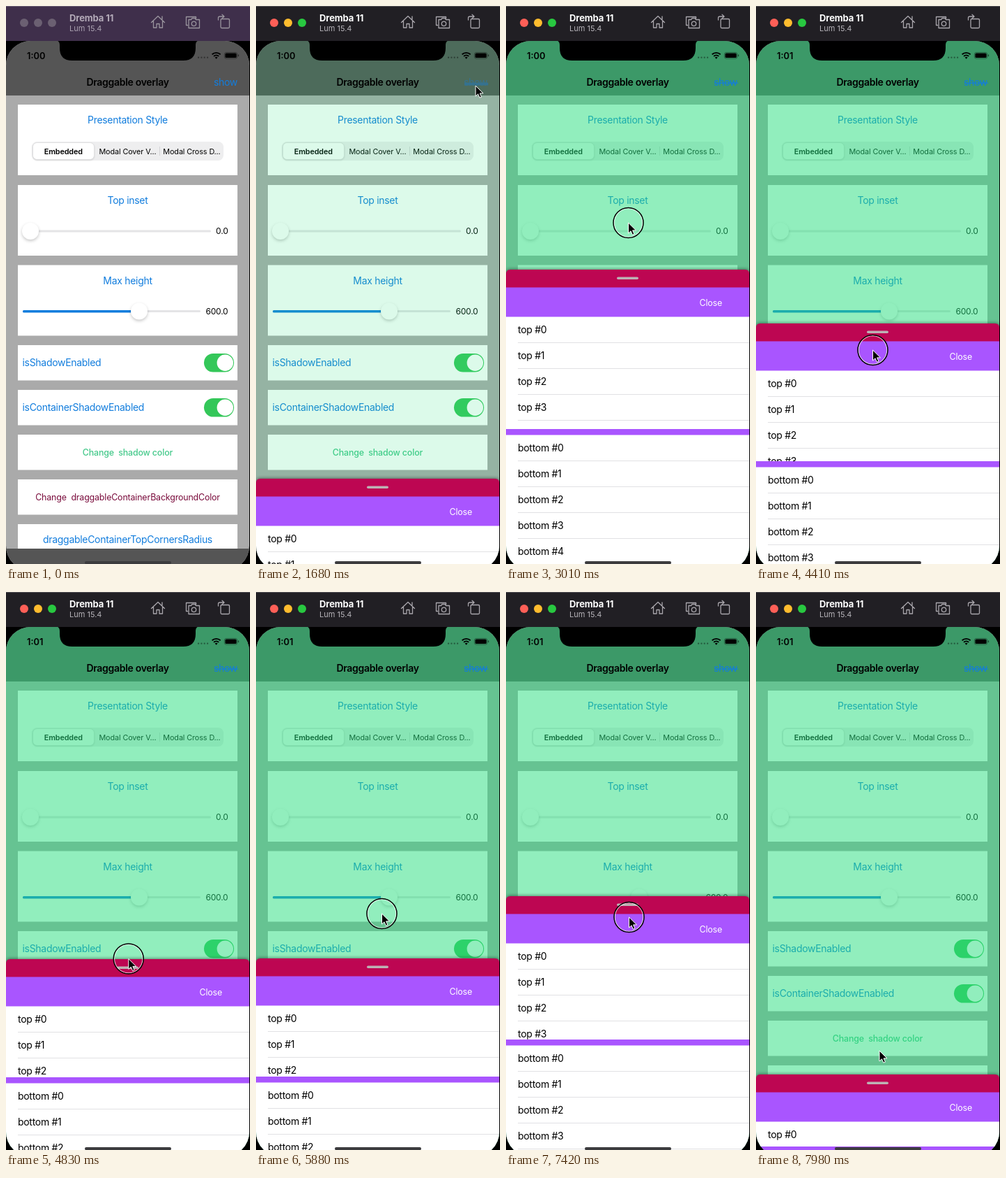
These frames come from a looping animation (350x798 px, 8 s). An HTML page:

```html
<!DOCTYPE html>
<html lang="en">
<head>
<meta charset="utf-8">
<title>Draggable overlay</title>
<style>
  html, body { margin: 0; width: 100%; height: 100%; overflow: hidden; background: #000; }
  svg { display: block; width: 350px; height: 798px; }
  text { font: 400 14px Inter, sans-serif; letter-spacing: -.3px; white-space: pre; }
  .small { font-size: 12.4px; letter-spacing: -.15px; }
  .value { font-size: 12px; letter-spacing: -.2px; }
  .segment { font-size: 10.8px; letter-spacing: -.1px; }
  .semi { font-weight: 600; }
  .link { fill: #127ddd; }
  .thumb { fill: #fff; filter: drop-shadow(0 2px 2px rgba(0,0,0,.22)); }
  #icons { fill: none; stroke: #a9a6ac; stroke-width: 1.3; stroke-linejoin: round; stroke-linecap: round; }
  #sheet { filter: drop-shadow(0 -1px 2px rgba(0,0,0,.4)); }
</style>
</head>
<body>
<svg id="stage" viewBox="0 0 350 798"></svg>
<script>
const LOOP = 8000, STEP = 70;
const TOP = 377, HIDDEN = 820;

const rect = (x, y, w, h, fill, r = 0, extra = '') =>
  `<rect x="${x}" y="${y}" width="${w}" height="${h}" rx="${r}" fill="${fill}" ${extra}/>`;
const circle = (x, y, r, fill, extra = '') =>
  `<circle cx="${x}" cy="${y}" r="${r}" fill="${fill}" ${extra}/>`;
const text = (x, y, str, cls = '', anchor = 'start', extra = '') =>
  `<text x="${x}" y="${y}" class="${cls}" text-anchor="${anchor}" ${extra}>${str}</text>`;
const card = (y, h) => rect(17, y, 315, h, '#fff');
const thumb = (x, y) => circle(x, y, 12, '#fff', 'class="thumb"');

function slider(y, title, end, at, value) {
  const mid = y + 66;
  return card(y, 101) + text(174.5, y + 27, title, 'link', 'middle')
    + rect(24, mid - 1.5, end - 24, 3, '#e4e4e6', 1.5)
    + (at > 40 ? rect(24, mid - 1.5, at - 24, 3.4, '#127ddd', 1.5) : '')
    + thumb(at, mid) + text(318.5, mid + 4, value, 'value', 'end');
}

function toggle(y, label) {
  return card(y, 50.5) + text(23.5, y + 30, label, 'link')
    + rect(284, y + 12, 43, 26.5, '#34c759', 13.2) + circle(314.3, y + 25.2, 11.7, '#fff');
}

function button(y, label, color, weight) {
  return card(y, 50.5) + text(174.5, y + 30, label, 'small', 'middle', `fill="${color}" style="font-weight:${weight}"`);
}

const settings = card(141, 101)
  + text(174.5, 168, 'Presentation Style', 'link', 'middle')
  + rect(37, 194, 275, 27, '#eeeeef', 7.5)
  + rect(38.5, 195.5, 88, 24, '#fff', 6, 'stroke="#dcdcde" stroke-width=".8" style="filter:drop-shadow(0 1px 1px rgba(0,0,0,.12))"')
  + text(82.3, 211.5, 'Embedded', 'segment semi', 'middle')
  + text(174.5, 211.5, 'Modal Cover V...', 'segment', 'middle')
  + text(266.5, 211.5, 'Modal Cross D...', 'segment', 'middle')
  + rect(220, 201, 1, 13, '#d4d4d6')
  + slider(256, 'Top inset', 294, 35, '0.0')
  + slider(370.5, 'Max height', 279, 191, '600.0')
  + toggle(485, 'isShadowEnabled')
  + toggle(549, 'isContainerShadowEnabled')
  + button(613, 'Change  shadow color', '#45c98b', 500)
  + button(677, 'Change  draggableContainerBackgroundColor', '#7a0c3c', 400)
  + card(741, 66) + text(174.5, 768, 'draggableContainerTopCornersRadius', 'link', 'middle');

const rows = (y, count, name) => Array.from({ length: count }, (_, i) =>
  text(17, y + 24 + 37 * i, `${name} #${i}`) + rect(17, y + 37 + 37 * i, 333, 1, '#e1e1e4')).join('');

const dots = [275, 279.3, 283.6, 288].map(x => rect(x, 72.5, 2.2, 2.2, '#000', .8, 'opacity=".4"')).join('');

const statusBar = text(30, 75.5, '1:00', 'semi', 'start', 'id="clock" style="font-size:12.8px;letter-spacing:0"') + dots
  + `<g fill="none" stroke="#000" stroke-width="1.9"><path d="M295.6 69.3a8.6 8.6 0 0 1 12 0M298 71.9a5.2 5.2 0 0 1 7.2 0"/></g>
     <path d="M299.6 73.6a3 3 0 0 1 4 0l-2 2.2z"/>`
  + rect(313.3, 66.4, 18.4, 8.8, 'none', 2.6, 'stroke="#000" stroke-opacity=".45" stroke-width=".8"')
  + rect(314.4, 67.5, 16.2, 6.6, '#000', 1.6) + rect(332.7, 69.3, 1.4, 3, '#000', .7, 'opacity=".5"');

const titleBar = rect(0, 0, 350, 50, '#211f24', 0, 'id="bar"') + rect(0, 0, 350, 1, '#fff', 0, 'opacity=".22"')
  + [26, 46, 66].map(x => circle(x, 24, 6, '#000', 'class="light"')).join('')
  + text(91, 22, 'Dremba 11', '', 'start', 'id="device" style="font-size:13px;font-weight:700;letter-spacing:-.1px"')
  + text(91, 36, 'Lum 15.4', '', 'start', 'id="system" style="font-size:11px;letter-spacing:0"')
  + `<g id="icons">
      <path d="M208.500 23.500L218 14.500l9.500 9M211.500 21.500V31h4.500v-5.500h4V31h4.500v-9.500M224 19v-4"/>
      <path d="M260.500 27.500h-2V15.500h14v2M262 19.500h3.500l1.500-2h4l1.500 2h5V31.500H262z"/><circle cx="269.500" cy="25.300" r="3.200"/>
      <rect x="308" y="18.500" width="12.500" height="13" rx="1.500"/><path d="M304.500 20v-3q0-2 2-2h6M310 12.300l3 2.700-3 2.700"/>
    </g>`;

document.getElementById('stage').innerHTML = `
  <clipPath id="screen"><rect y="50" width="349" height="757" rx="35"/></clipPath>
  <rect width="350" height="798"/>
  <g clip-path="url(#screen)">
    ${rect(0, 50, 350, 757, '#aaa')}${settings}
    ${rect(0, 776, 350, 31, '#555')}
    ${rect(0, 50, 350, 77, '#555')}${rect(0, 127, 350, .8, '#444')}
    ${rect(0, 50, 350, 757, 'rgb(37,221,124)', 0, 'id="tint"')}
    ${statusBar}
    ${text(174.5, 114, 'Draggable overlay', 'semi', 'middle')}
    <g id="show">${text(332, 114, 'show', 'link', 'end')}${rect(299, 109.5, 34, 1.2, '#127ddd', .5, 'id="strike"')}</g>
    <path d="M70 49q7 0 7 7v4q0 18 18 18h159q18 0 18-18v-4q0-7 7-7z"/>
    <g id="sheet">
      <path d="M0 440V6q0-6 6-6H343q6 0 6 6V440z" fill="#bd0652"/>
      ${rect(159, 10.5, 31, 3.6, '#bdb2b4', 1.8)}
      ${rect(0, 67, 350, 800, '#fff')}
      ${rect(0, 25.5, 350, 42, '#a955ff')}
      ${text(310, 51.5, 'Close', 'small', 'end', 'fill="#fff"')}
      ${rows(67, 4, 'top')}
      <g id="lower">${rect(0, 0, 350, 600, '#fff')}${rect(0, 0, 350, 8.5, '#a955ff')}${rows(8, 6, 'bottom')}</g>
    </g>
    ${rect(113, 794, 124, 4.2, '#3c3c3e', 2.1)}
  </g>
  ${titleBar}
  <g id="cursor">
    <g id="press" fill="none"><circle r="20.300" stroke="#fff" stroke-opacity=".75" stroke-width="1.200"/><circle r="21.500" stroke="#000" stroke-width="1.500"/></g>
    <path d="M0 0V15l3.500-3.200 2.400 5.400 2.500-1.100-2.300-5.200H11z" stroke="#fff" stroke-width="1"/>
  </g>`;

// time, sheet top
const sheetPath = [
  [1610, HIDDEN], [1680, 676], [1750, 552], [1820, 468], [1890, 417], [1960, 391], [2100, TOP],
  [3600, TOP], [4060, 410], [4410, 454], [4690, 540], [4900, 518], [5110, 469],
  [5460, 469], [5670, 540], [5740, 556], [5880, 524], [5950, 470], [6090, 390], [6160, TOP],
  [7140, TOP], [7420, 435], [7700, 550], [7840, 620], [7980, 690],
];
// time, x, y
const cursorPath = [
  [0, 362, 780], [140, 342, 740], [560, 320, 260], [840, 314, 129], [980, 313, 121], [1120, 315, 114],
  [1680, 315, 114], [2100, 215, 300], [2450, 162, 378], [2660, 176, 389], [2800, 175.5, 389],
  [3010, 175.5, 310], [3290, 176, 250], [3570, 175, 389], [4060, 170, 432], [4410, 167.5, 492],
  [4620, 172, 553], [4900, 177, 515], [5110, 178, 484], [5320, 178, 481], [5460, 178, 482],
  [5670, 181, 565], [5740, 181, 560], [5880, 180.5, 460], [6090, 184, 330], [6230, 214, 288],
  [6370, 221, 285], [6510, 221, 285], [6580, 223, 243], [6720, 215, 300], [6860, 186, 386],
  [7070, 180, 390], [7140, 180, 390], [7420, 176.5, 465], [7700, 176, 580], [7840, 177, 640], [7980, 177, 656],
];
const presses = [[1120, 1190], [1400, 1540], [2800, 5110], [5460, 6100], [7140, 7910]];

function sample(path, t, col) {
  const next = path.findIndex(key => key[0] > t);
  if (next === 0) return path[0][col];
  if (next < 0) return path[path.length - 1][col];
  const a = path[next - 1], b = path[next];
  return a[col] + (b[col] - a[col]) * (t - a[0]) / (b[0] - a[0]);
}

const el = id => document.getElementById(id);
const set = (id, name, value) => el(id).setAttribute(name, value);
const lights = document.querySelectorAll('.light');
const move = (id, x, y) => set(id, 'transform', `translate(${x} ${y})`);

function draw(t) {
  const active = t >= 1120;
  const lightColors = active ? ['#fe5f57', '#febc2e', '#28c840'] : Array(3).fill('#6b6072');
  lights.forEach((light, i) => light.setAttribute('fill', lightColors[i]));
  set('bar', 'fill', active ? '#211f24' : '#3f2f4b');
  set('device', 'fill', active ? '#fff' : '#b3aab8');
  set('system', 'fill', active ? '#b5b2b8' : '#aaa1b0');
  set('icons', 'opacity', active ? 1 : .85);

  const y = Math.round(sample(sheetPath, t, 1));
  const presenting = t < 2200;
  move('sheet', 0, y);
  set('sheet', 'visibility', y < HIDDEN ? 'visible' : 'hidden');
  move('lower', 0, presenting ? 228 : Math.round(605 + .6 * (y - TOP)) - y);
  set('tint', 'opacity', .5 * (presenting ? (HIDDEN - y) / (HIDDEN - TOP) : 1));

  const pressed = presses.some(([from, to]) => t >= from && t < to);
  set('press', 'visibility', pressed ? 'visible' : 'hidden');
  move('cursor', sample(cursorPath, t, 1), sample(cursorPath, t, 2));

  const clicked = t >= 1400 && t < 1900;
  set('show', 'opacity', clicked ? .4 : 1);
  set('strike', 'visibility', t >= 1610 ? 'visible' : 'hidden');
  set('strike', 'height', clicked ? 4 : 1.2);
  el('clock').textContent = t < 3990 ? '1:00' : '1:01';
}

const start = performance.now();
function tick() {
  const t = (performance.now() - start) % LOOP;
  draw(Math.floor(t / STEP) * STEP);
  requestAnimationFrame(tick);
}
draw(0);
requestAnimationFrame(tick);
</script>
</body>
</html>
```
